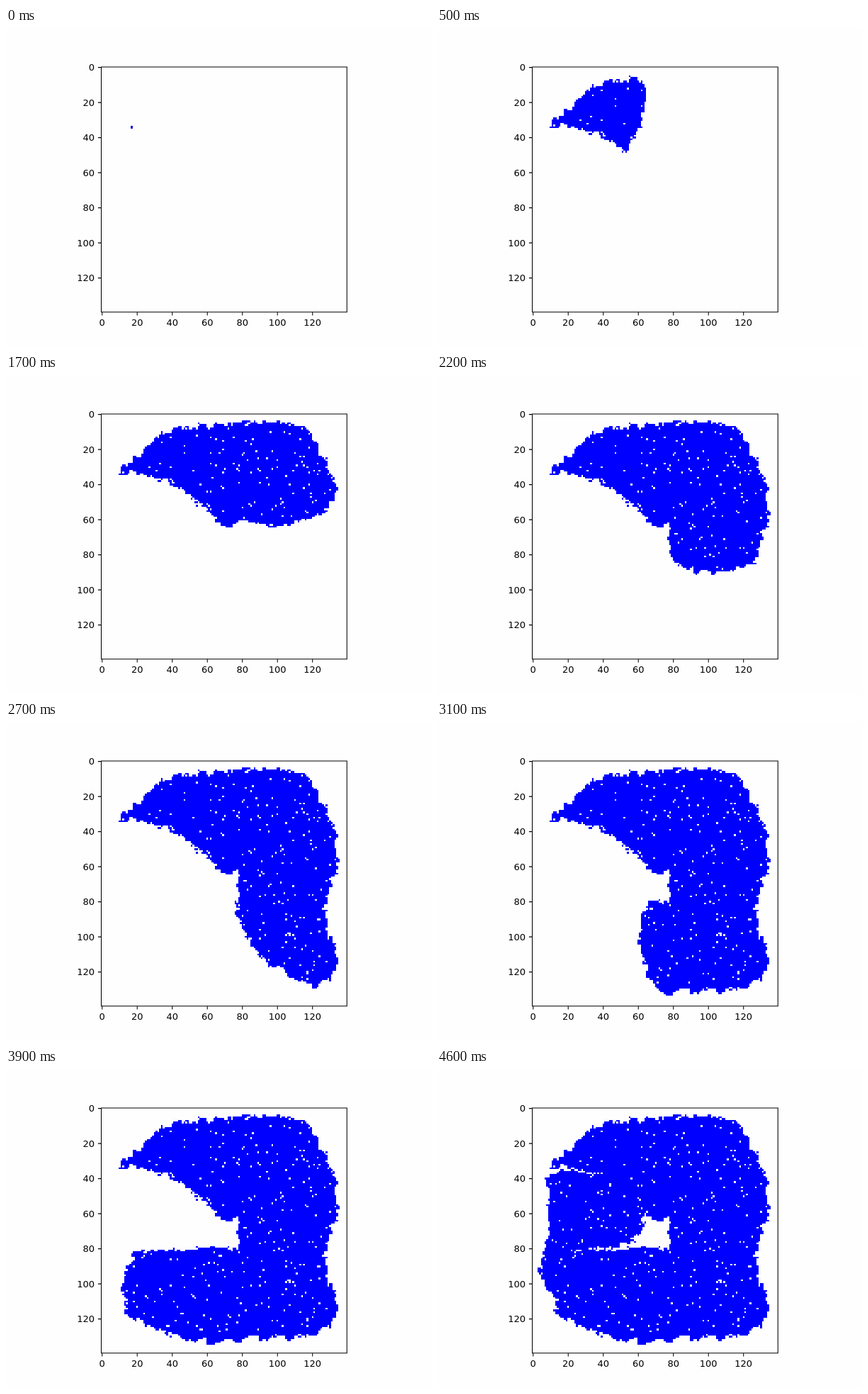
Recreate the animation shown at these times as an HTML page with a canvas. Size 600 by 450 pixels, loop 4700 ms.

```html
<!DOCTYPE html>
<html lang="en">
<head>
<meta charset="utf-8">
<title>Growing cluster</title>
<style>
  html, body { margin: 0; width: 100%; height: 100%; overflow: hidden; background: #fefefe; }
  canvas, svg { position: absolute; left: 0; top: 0; }
  text { font: 13.02px "DejaVu Sans", sans-serif; fill: #000; }
</style>
</head>
<body>
<canvas id="plot" width="600" height="450"></canvas>
<svg id="axes" width="600" height="450" viewBox="0 0 600 450"></svg>
<script>
const LOOP = 4700, STEP = 100, N = 140;
const LEFT = 134.5, TOP = 54.4, CELL = 2.475;
const HOLES = 0.024, BULGE = 0.16;
const ctx = document.getElementById('plot').getContext('2d');
const axes = document.getElementById('axes');

// The growing front at key times: outer end and inner end, in cells.
const fronts = [
  { t: 0, outer: [10, 28], inner: [11, 35] },
  { t: 150, outer: [18, 27], inner: [19, 33] },
  { t: 300, outer: [33, 11], inner: [37, 38] },
  { t: 600, outer: [74, 5], inner: [58, 53] },
  { t: 900, outer: [86, 5], inner: [71, 64] },
  { t: 1200, outer: [115, 8], inner: [74, 63] },
  { t: 1700, outer: [134, 48], inner: [76, 60] },
  { t: 2200, outer: [127, 84], inner: [78, 82] },
  { t: 2600, outer: [130, 124], inner: [77, 80] },
  { t: 3100, outer: [73, 132], inner: [66, 78] },
  { t: 3500, outer: [48, 131], inner: [42, 81] },
  { t: 3900, outer: [14, 116], inner: [20, 82] },
  { t: 4000, outer: [4, 93], inner: [30, 81] },
  { t: 4200, outer: [9, 66], inner: [57, 76] },
  { t: 4600, outer: [7, 38], inner: [64, 58] }
];

function spline(a, b, c, d, u) {
  return b + u * (c - a + u * (2 * a - 5 * b + 4 * c - d + u * (3 * (b - c) + d - a))) / 2;
}

// Points along the front, from its outer to its inner end, bowed forwards.
function frontAt(time) {
  const last = fronts.length - 1;
  let k = 0;
  while (k < last - 1 && time >= fronts[k + 1].t) k++;
  const near = [k - 1, k, k + 1, k + 2].map(i => fronts[Math.min(last, Math.max(0, i))]);
  const u = (time - near[1].t) / (near[2].t - near[1].t);
  const end = (side, axis) => spline(...near.map(f => f[side][axis]), u);
  const ox = end('outer', 0), oy = end('outer', 1);
  const dx = end('inner', 0) - ox, dy = end('inner', 1) - oy;
  const points = [];
  for (let s = 0; s <= 1; s += 0.125) {
    const bow = BULGE * 4 * s * (1 - s);
    points.push([ox + dx * s + dy * bow, oy + dy * s - dx * bow]);
  }
  return points;
}

// Repeatable pseudo-random value in 0..1 for a grid place.
function hash(x, y, seed) {
  let h = Math.imul(x + 1, 374761393) ^ Math.imul(y + 1, 668265263) ^ Math.imul(seed, 974711);
  h = Math.imul(h ^ (h >>> 13), 1274126177);
  h = Math.imul(h ^ (h >>> 15), 2246822519);
  return ((h ^ (h >>> 16)) >>> 0) / 4294967296;
}

// Shifts whole blocks of cells, which makes every edge ragged.
function ragged(i, j, seed) {
  const noise = size => hash(Math.floor(i / size), Math.floor(j / size), seed + size) - 0.5;
  return 2.6 * noise(5) + 2 * noise(2);
}

function makeCells() {
  const cells = [];
  const seen = new Set();
  for (let at = STEP; at < LOOP; at += STEP) {
    const strip = [...frontAt(at - STEP), ...frontAt(at).reverse()];
    const path = new Path2D();
    strip.forEach(p => path.lineTo(...p));
    path.closePath();
    const range = axis => {
      const v = strip.map(p => p[axis]);
      return [Math.max(0, Math.floor(Math.min(...v)) - 3), Math.min(N - 1, Math.ceil(Math.max(...v)) + 3)];
    };
    const [x0, x1] = range(0), [y0, y1] = range(1);
    for (let j = y0; j <= y1; j++) for (let i = x0; i <= x1; i++) {
      const id = j * N + i;
      if (seen.has(id) || hash(i, j, 1) < HOLES) continue;
      if (!ctx.isPointInPath(path, i + ragged(i, j, 10), j + ragged(i, j, 20))) continue;
      seen.add(id);
      cells.push({ i, j, at });
    }
  }
  return cells;
}

const px = i => Math.round(LEFT + i * CELL);
const py = j => Math.round(TOP + j * CELL);

function draw(time) {
  ctx.fillStyle = '#fefefe';
  ctx.fillRect(0, 0, 600, 450);
  if (time === 0) {
    ctx.fillStyle = '#1010dc';
    ctx.fillRect(176, 138, 3, 4);
    return;
  }
  ctx.fillStyle = '#0000ff';
  for (const { i, j, at } of cells) {
    if (at <= time) ctx.fillRect(px(i), py(j), px(i + 1) - px(i), py(j + 1) - py(j));
  }
}

function drawAxes() {
  let ticks = '', labels = '';
  for (let v = 0; v <= 120; v += 20) {
    const x = LEFT + (v + 0.5) * CELL, y = TOP + (v + 0.5) * CELL;
    ticks += `M${x} 400.8v4.6M134.5 ${y}h-4.6`;
    labels += `<text x="${x}" y="420" text-anchor="middle">${v}</text>` +
      `<text x="125.1" y="${y + 4.7}" text-anchor="end">${v}</text>`;
  }
  axes.innerHTML =
    `<path d="M134.5 54.9H481.3V400.8H134.5Z${ticks}" fill="none" stroke="#000" stroke-width="1.04"/>` + labels;
}

const cells = makeCells();
drawAxes();

const start = performance.now();
let shown = -1;
function tick() {
  const t = (performance.now() - start) % LOOP;
  const time = Math.floor(t / STEP) * STEP;
  if (time !== shown) draw(shown = time);
  requestAnimationFrame(tick);
}
tick();
</script>
</body>
</html>
```
